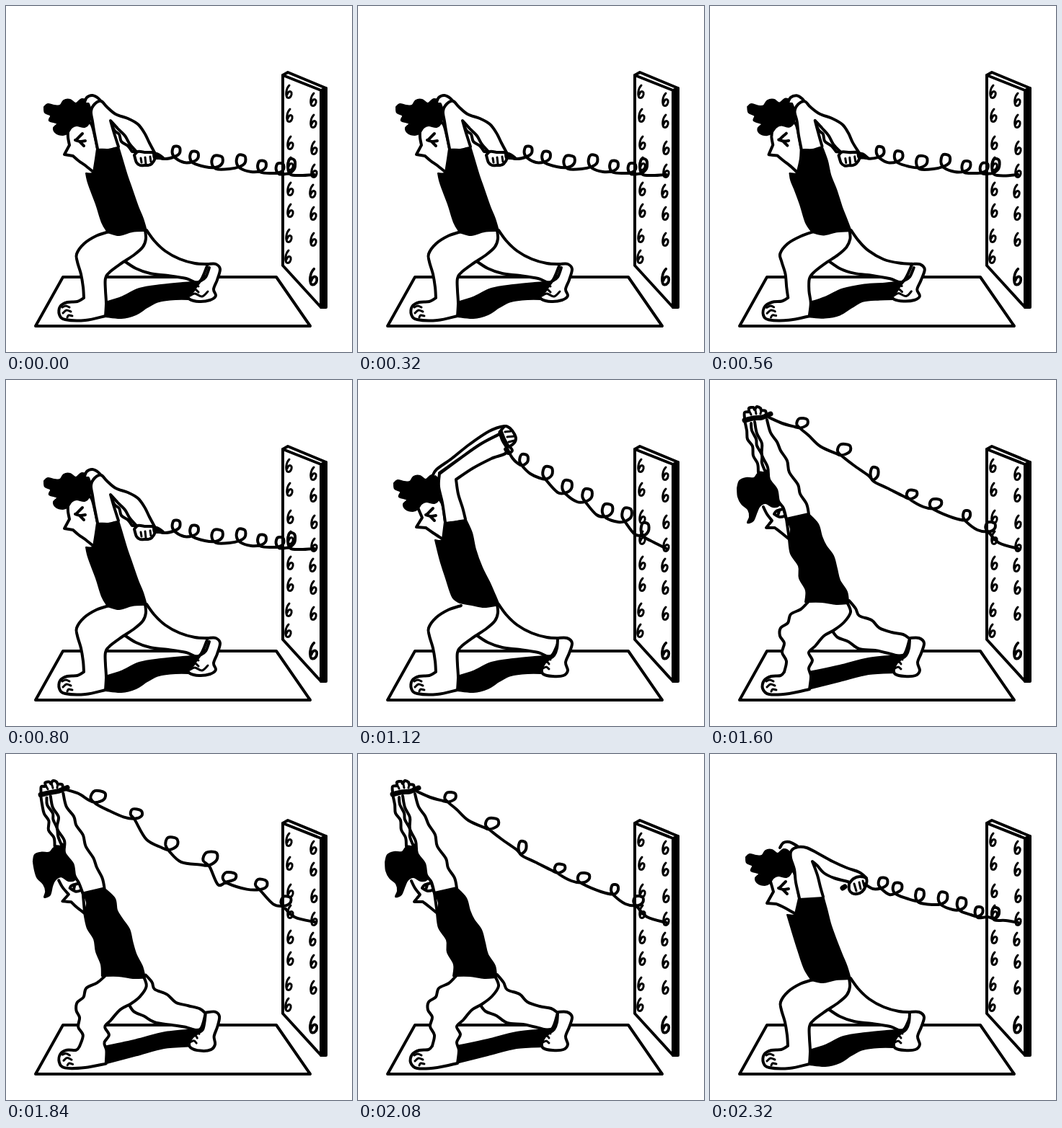
Animation of 480 by 480 pixels, one loop 2.4 s. Source, as an HTML page:

```html
<!DOCTYPE html>
<html lang="en">
<head>
<meta charset="utf-8">
<title>Stretching</title>
<style>
html, body { margin: 0; width: 100%; height: 100%; overflow: hidden; background: #fff; }
svg { display: block; width: 100%; height: 100%; }
path { fill: none; stroke: #000; stroke-width: 4; stroke-linecap: round; stroke-linejoin: round; }
.w { fill: #fff; }
.k { fill: #000; stroke-width: 2; }
.t { stroke-width: 3; }
.b { stroke-width: 7; }
</style>
</head>
<body>
<svg id="stage" viewBox="0 0 480 480"></svg>
<script>
const STEP = 80, COUNT = 30;
const stage = document.getElementById('stage');
const same = (x, y) => [x, y];

function add(parent, tag, attrs = {}) {
  const el = document.createElementNS('http://www.w3.org/2000/svg', tag);
  for (const key in attrs) el.setAttribute(key, attrs[key]);
  return parent.appendChild(el);
}

const parse = text => text.trim().split(/\s+/).map(p => p.split(',').map(Number));

// Smooth curve through points, without the leading move.
function curve(p) {
  let d = '';
  for (let i = 0; i < p.length - 1; i++) {
    const a = p[i - 1] || p[i], b = p[i], c = p[i + 1], e = p[i + 2] || c;
    const q = [0, 1].map(k => b[k] + (c[k] - a[k]) / 6);
    const r = [0, 1].map(k => c[k] - (e[k] - b[k]) / 6);
    d += 'C' + [...q, ...r, ...c].map(v => v.toFixed(1)).join(' ');
  }
  return d;
}

// "/" marks a sharp corner, ";" lifts the pen.
function trace(text, warp = same) {
  return text.split(';').map(run => {
    let last, d = '';
    for (const part of run.split('/')) {
      const pts = parse(part).map(([x, y]) => warp(x, y));
      if (!last) d = 'M' + pts[0].join(' ');
      d += curve(last ? [last, ...pts] : pts);
      last = pts[pts.length - 1];
    }
    return d;
  }).join('');
}

// Coiled cord: a two-number point is a sag, a four-number point is a loop (centre and size).
function cord(text, warp) {
  const pts = [];
  for (const [x, y, w, h] of parse(text)) {
    if (!w) pts.push([x, y]);
    else pts.push([x - w * .15, y + h * .5], [x + w * .4, y + h * .15], [x + w * .38, y - h * .42],
      [x - w * .25, y - h * .5], [x - w * .45, y + h * .1], [x - w * .1, y + h * .62]);
  }
  return 'M' + warp(...pts[0]).join(' ') + curve(pts.map(p => warp(...p)));
}

const shift = (text, dx, dy) =>
  text.replace(/(-?[\d.]+),(-?[\d.]+)/g, (m, x, y) => `${+x + dx},${+y + dy}`);

const hair = '53,140 58,136 67,138 75,138 80,131 89,130 97,135 105,129 114,134 118,148 116,161 109,168 98,166 91,169 86,176 79,179 69,176 66,169 71,163 60,159 62,152 54,148 53,140';
const eye = '97,186 102,181 106,177;96,186 103,188 110,187;102,188 105,191 108,194';
const toes = '78,418 83,416 88,418;79,426 84,422 90,424;85,432 87,429 92,430';

const smoothLegs = foot => [
  ['w', '195,311 206,326 221,340 241,351 262,357 280,358 / 268,383 250,378 225,374 200,371 180,364 163,353'],
  ['k', '137,411 160,404 185,392 215,387 245,384 270,382 / 262,395 258,407 / 235,407 212,410 196,418 180,428 160,433 138,431 / 137,411'],
  ...foot,
  ['w', '143,313 125,319 108,330 98,344 99,355 104,372 107,390 108,405 / 99,410 85,411 75,417 74,428 82,435 110,436 138,430 / 139,412 138,395 138,378 144,369 160,357 178,345 190,334 194,323 193,311'],
  ['t', toes]
];

const footOut = [
  ['w', '277,358 290,358 297,365 293,379 288,392 291,403 285,410 270,411 257,408 255,401 259,392 265,387 / 272,382 276,372 277,360'],
  ['t', '258,386 262,385 267,388;256,393 262,391 265,394;255,401 261,398 265,401']
];

const footIn = [
  ['w', '281,358 291,358 297,365 293,380 288,393 291,402 283,408 268,410 255,407 253,401 259,396 263,390 269,382 / 277,376 282,363'],
  ['t', '257,387 262,386 267,389;255,394 261,392 267,397;255,402 262,399 272,403 280,396']
];

const shakyLegs = [
  ['w', '193,306 202,317 207,327 224,333 235,344 252,350 268,353 277,359 / 268,382 247,379 229,375 207,373 192,363 177,357 169,347'],
  ['k', '138,405 180,396 220,386 268,381 / 262,394 257,406 / 220,408 180,418 140,428 / 138,405'],
  ...footOut,
  ['w', '136,308 126,318 112,325 108,337 98,344 97,355 103,365 100,378 106,390 103,405 / 98,410 85,411 75,417 73,428 82,436 110,435 138,429 / 140,411 137,400 142,389 137,378 146,369 158,355 172,347 186,336 195,322 190,308'],
  ['t', toes]
];

const low = {
  cord: '206,206 219,212 236,202,12,14 247,217 261,209,13,14 276,223 293,216,17,16 310,226 326,215,14,16 340,230 355,222,13,14 368,232 380,225,12,13 388,233 396,222,11,19 409,235 428,234',
  parts: [
    ...smoothLegs(footIn),
    ['w', '86,172 86,182 88,193 / 81,206 / 93,208 / 101,215 111,222 122,231 / 125,212 127,198 / 119,165 110,160'],
    ['k', hair],
    ['', eye],
    ['w', '109,134 112,127 120,124 128,128 133,134'],
    ['w', '143,154 150,172 157,178 160,188 169,194 175,202 / 184,202 / 175,185 165,170'],
    ['k', '127,198 142,199 156,195 / 162,215 168,235 175,255 183,278 190,295 195,312 / 175,313 157,318 141,314 / 133,300 125,275 117,254 113,242 111,232 / 122,231 125,215 127,198'],
    ['w', '127,198 123,178 120,160 118,146 123,136 132,132 140,140 152,150 169,156 183,164 192,176 199,190 206,203 / 182,203 / 172,192 165,180 155,170 145,159 / 149,173 156,195'],
    ['w', '178,207 183,202 194,203 206,204 207,211 202,219 197,221 192,221 186,221 181,217 178,207'],
    ['t', '187,211 188,217;193,210 194,219;200,209 201,216'],
    ['k', '204,203 212,205 220,212 212,212 205,211 204,203']
  ]
};

const mid = {
  cord: '214,180 226,187 240,179,14,14 249,195 260,186,14,14 275,201 291,196,13,16 308,209 323,200,14,16 337,216 349,208,14,16 362,223 373,219,12,13 385,226 396,221,11,15 410,231 428,234',
  parts: [
    ...smoothLegs(footOut),
    ['w', '84,177 88,191 / 79,207 / 92,208 / 103,213 119,222 / 124,200 / 117,165 108,160'],
    ['k', shift(hair, -3, 3)],
    ['', shift(eye, -1, 0)],
    ['w', '97,130 102,123 110,122 120,127 126,132'],
    ['b', '184,186 187,184'],
    ['k', '124,200 140,199 157,197 / 162,215 167,235 174,255 183,278 190,295 195,312 / 175,313 157,317 141,314 / 131,298 122,272 113,243 107,223 / 119,222 124,200'],
    ['w', '124,200 119,178 117,160 112,144 113,134 122,129 134,130 150,138 170,149 190,158 207,164 217,172 / 205,182 191,177 / 172,172 158,165 149,155 142,149 / 149,168 153,184 157,198'],
    ['w', '193,180 199,173 208,170 217,173 216,183 211,191 204,194 197,193 193,188 193,180'],
    ['t', '200,180 203,190;207,178 209,187;212,176 214,184']
  ]
};

const high = {
  cord: '207,95 214,108 222,116 230,111,13,15 239,130 252,136 263,129,15,17 277,156 290,148,15,17 304,169 318,160,15,17 331,187 346,181,16,17 361,197 373,187,15,18 384,214 398,207,12,17 410,225 428,234',
  parts: [
    ...smoothLegs(footOut),
    ['w', '83,177 89,191 / 81,204 / 94,205 / 104,212 118,221 / 121,197 / 117,172 108,160'],
    ['k', shift(hair, -3, 3)],
    ['', shift(eye, -2, 1)],
    ['w', '103,134 109,124 130,109 155,89 182,71 203,64 211,67 / 198,74 / 170,89 140,110 113,129'],
    ['k', '121,197 136,196 149,192 / 158,212 163,235 172,260 183,282 190,298 196,312 / 175,315 158,312 141,309 / 131,301 122,275 114,250 107,222 / 118,221 121,197'],
    ['w', '121,197 117,170 112,148 113,130 / 140,110 170,89 197,75 / 207,99 185,109 160,122 136,138 / 139,158 145,177 149,193'],
    ['w', '197,72 204,64 212,68 217,75 219,82 215,89 207,92 200,83 197,72'],
    ['t', '204,72 212,71;207,79 216,78;209,86 217,84'],
    ['b', '198,73 202,83 207,92'],
    ['w', '204,96 209,92 214,98 208,102 204,96']
  ]
};

const shakyBody = [
  ...shakyLegs,
  ['w', '74,176 79,186 86,195 / 78,205 / 90,205 / 99,212 110,221 / 106,193 / 97,168 80,165'],
  ['k', '38,150 41,140 50,136 61,136 66,130 75,125 84,130 90,144 92,156 98,165 96,174 87,176 77,171 69,175 65,183 60,195 52,198 55,190 53,180 44,172 39,162 38,150'],
  ['', '101,179 92,182 89,186 / 97,190 106,188;96,182 94,188'],
  ['w', '48,56 51,70 52,82 59,92 60,105 66,116 67,128 / 78,130 / 72,115 72,104 65,91 64,82 58,70 57,60'],
  ['k', '106,193 122,188 137,186 / 150,200 155,217 161,230 171,244 176,262 180,278 190,294 192,310 / 175,311 155,308 132,308 / 133,292 124,275 123,258 112,241 109,221 / 112,207 106,193'],
  ['w', '62,58 65,74 72,88 72,104 80,121 82,138 92,152 95,168 102,178 106,193 / 137,186 / 134,172 125,158 122,145 110,128 107,112 98,98 93,86 84,73 79,55'],
  ['w', '48,53 48,45 54,44 54,39 60,38 62,41 65,37 70,39 71,42 77,43 78,49'],
  ['t', '55,44 57,48;63,42 64,47;71,43 70,47'],
  ['b', '48,56 60,53 72,52 84,47']
];

const topA = {
  cord: '82,52 100,60 118,65 128,60,17,13 137,77 153,92 175,102 186,97,20,15 199,118 219,132 228,130,12,17 246,150 268,161 280,159,16,12 296,176 313,172,18,13 337,191 356,188,11,13 371,208 389,204,15,13 401,226 428,234',
  parts: shakyBody
};

const topB = {
  cord: '82,50 100,54 115,64 128,60,22,16 143,78 162,88 180,83,18,13 194,118 215,130 229,124,19,17 243,150 268,153 284,145,22,18 295,182 310,171,20,13 334,188 355,181,18,14 371,208 388,205,15,13 401,226 428,234',
  parts: shakyBody
};

const tremble = (x, y) => [x + .8 * Math.sin(y / 8), y + .5 * Math.sin(x / 9)];
const quiver = (x, y) => [x + Math.sin(y / 6), y + .8 * Math.sin(x / 7)];
const reach = (x, y) => [x, y - 6 * Math.max(0, 1 - y / 250) * Math.max(0, 1 - x / 420)];

function drawRoom() {
  add(stage, 'rect', { width: 480, height: 480, fill: '#fff' });
  add(stage, 'path', { d: 'M79 376H375L422 444H41Z' });
  add(stage, 'path', { class: 'w', d: 'M384 96L391 92L444 114V418H437L384 360Z' });
  add(stage, 'path', { d: 'M384 96L437 117V418M437 117L444 114M441 116V417' });
  const six = 'M1-9C-4-4-4 5-2 8C2 10 5 5 4 1C2-2-1 0-2 4';
  const column = text => parse(text).forEach(([x, y, s = 1]) =>
    add(stage, 'path', { class: 't', d: six, transform: `translate(${x} ${y}) scale(${s})` }));
  column('392,119 393,152 394,190 394,219 394,254 394,284 392,319 391,348');
  column('426,130 426,160 427,197 427,229 425,257 426,288 426,324 426,376,1.25');
}

function makePose({ parts, cord: line }, warp = same) {
  const g = add(stage, 'g', { display: 'none' });
  for (const [cls, text] of parts) add(g, 'path', { class: cls, d: trace(text, warp) });
  add(g, 'path', { d: cord(line, warp) });
  return g;
}

drawRoom();
const poses = {
  low: makePose(low), lowShake: makePose(low, tremble),
  mid: makePose(mid), high: makePose(high),
  peak: makePose(topB, reach), topA: makePose(topA), topB: makePose(topB, quiver)
};

function poseAt(i) {
  if (i < 13) return i % 2 ? 'lowShake' : 'low';
  if (i === 13 || i === 29) return 'mid';
  if (i === 14 || i === 28) return 'high';
  if (i === 15) return 'peak';
  return i % 2 ? 'topB' : 'topA';
}

let shown;
function update(time) {
  const next = poses[poseAt(Math.floor(time / STEP) % COUNT)];
  if (next !== shown) {
    if (shown) shown.setAttribute('display', 'none');
    next.removeAttribute('display');
    shown = next;
  }
}

const start = performance.now();
function tick() {
  update(performance.now() - start);
  requestAnimationFrame(tick);
}
tick();
</script>
</body>
</html>
```
